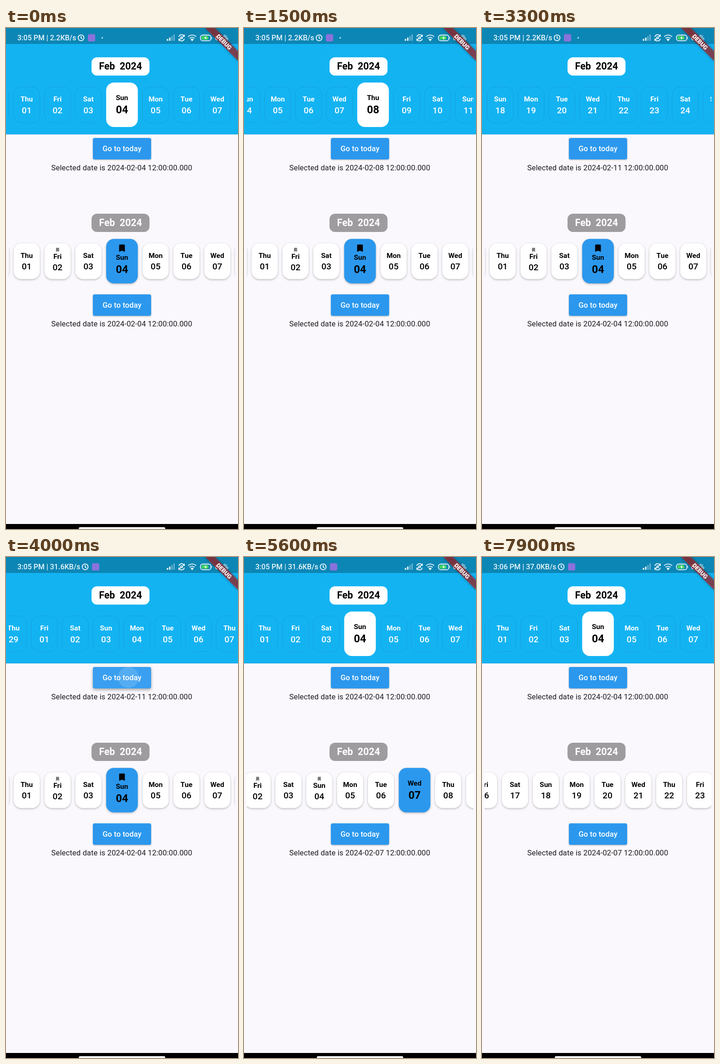
An HTML page that plays this animation: 510x1098 px, repeating every 8 s.

```html
<!DOCTYPE html>
<html lang="en">
<head>
<meta charset="utf-8">
<title>Date timeline</title>
<style>
  html, body { margin: 0; width: 100%; height: 100%; overflow: hidden; background: #faf8fc; }
  svg { display: block; width: 100%; height: 100%; }
  text { font-family: Roboto, sans-serif; white-space: pre; }
  .mid { text-anchor: middle; }
  .status text { font-size: 16px; font-weight: 500; fill: #eaf6fb; }
  .line { fill: none; stroke: #eaf6fb; stroke-width: 1.9; }
  .solid { fill: #eaf6fb; }

  .month { font-size: 21.3px; font-weight: 700; }
  .btn { fill: #2b98ee; filter: drop-shadow(0 1.6px 1.6px rgba(0,0,0,.3)); }
  .btn.down { fill: #3a9ff0; filter: drop-shadow(0 3px 3px rgba(0,0,0,.35)); }
  .btnText { font-size: 16.5px; font-weight: 500; letter-spacing: .12px; fill: #fff; }
  .info { font-size: 16.5px; letter-spacing: .15px; fill: #1d1b20; }

  .card rect { x: -28.8px; y: 129px; width: 57.6px; height: 78.6px; rx: 17px; }
  .card .day { font-size: 15.5px; font-weight: 700; transform: translateY(161.4px); }
  .card .num { font-size: 19px; font-weight: 500; transform: translateY(186.5px); }
  .card .mark { fill: #79777a; transform: translateY(143.4px) scale(.48); }
  .card.marked .day { transform: translateY(163.2px); }
  .card.marked .num { transform: translateY(188.4px); }
  .card.on rect { x: -34.8px; y: 119.6px; width: 69.6px; height: 97.4px; }
  .card.on .day { transform: translateY(158.2px); }
  .card.on .num { font-size: 23.5px; font-weight: 700; transform: translateY(186.8px); }
  .card.on .mark { fill: #000; transform: translateY(139.8px) scale(.9); }
  .card.on.marked .day { transform: translateY(165.2px); }
  .card.on.marked .num { transform: translateY(193.8px); }

  .blue .card rect { fill: none; stroke: #1a7fae; stroke-opacity: .36; }
  .blue .card text { fill: #fff; }
  .blue .card.on rect { fill: #fff; stroke: none; }
  .blue .card.on text { fill: #000; }
  .plain .cards { filter: drop-shadow(0 2px 2px rgba(0,0,0,.2)) drop-shadow(0 0 1px rgba(0,0,0,.1)); }
  .plain .card rect { fill: #fff; }
  .plain .card.on rect { fill: #2b98ee; }
</style>
</head>
<body>
<svg viewBox="0 0 510 1098" preserveAspectRatio="none">
  <defs>
    <clipPath id="view"><rect x="5.8" y="110" width="498.4" height="115"/></clipPath>
    <clipPath id="btnBox"><rect x="191" y="241" width="128" height="47" rx="4"/></clipPath>
  </defs>
  <rect width="510" height="1098" fill="#faf8fc"/>
  <rect width="510" height="233" fill="#13b3f2"/>
  <rect y="232.3" width="510" height="1" fill="#178fc4" opacity=".6"/>

  <g class="status">
    <rect width="510" height="35" fill="#0c86b5"/>
    <text id="clock" x="25" y="27.4"></text>
    <g id="notes">
      <circle class="line" cx="165" cy="21.5" r="6.4"/>
      <path class="line" d="M165 17.5v4.4l3 1.8"/>
      <rect x="180" y="13.5" width="16" height="16" rx="3.5" fill="#8a72dc"/>
    </g>
    <circle id="dot" class="solid" cx="211.5" cy="21.5" r="1.6"/>
    <path class="solid" d="M353.5 24h3v4h-3zM358.5 21h3v7h-3z"/>
    <path class="solid" opacity=".4" d="M363.3 17.5h3V28h-3zM368 14h3v14h-3z"/>
    <path class="line" d="M380 19.5a6.3 6.3 0 0 1 11.5-1.8M392 23.5a6.3 6.3 0 0 1-11.5 1.8M392 14.5v4h-4M380 28.3v-4h4"/>
    <circle class="line" cx="386" cy="21.5" r="2"/>
    <path class="line" stroke-width="2.4" d="M400.5 19a12.3 12.3 0 0 1 17.4 0M403.7 22.6a7.8 7.8 0 0 1 11 0"/>
    <path class="solid" d="M409.2 29l-3.6-4a5.2 5.2 0 0 1 7.2 0z"/>
    <rect class="line" stroke-width="1.6" x="427.5" y="15.5" width="23" height="12.4" rx="5"/>
    <rect x="430" y="17.8" width="15" height="7.8" rx="2.8" fill="#40d65c"/>
    <path class="solid" d="M440 17l-4.5 5.3h3l-1 4.2 4.5-5.4h-3zM451.6 19.5c1.6.6 1.6 4 0 4.5z"/>
    <text x="459" y="27.4">66%</text>
  </g>

  <g id="panels"></g>

  <g transform="translate(510 0) rotate(45)">
    <rect x="-51" y="35.7" width="102" height="15.3" fill="#b71c1c" fill-opacity=".63"
          style="filter:drop-shadow(0 0 3px rgba(0,0,0,.5))"/>
    <text class="mid" y="48" font-size="13" font-weight="900" fill="#fff">DEBUG</text>
  </g>

  <rect y="1087" width="510" height="11" fill="#000"/>
  <rect x="160" y="1094" width="190" height="8" rx="3" fill="#fff"/>
</svg>

<script>
const LOOP = 8000, STEP = 100;
const PITCH = 67.8, GROW = 12.2, ORIGIN = 248.9;   // card spacing, extra width of the chosen card
const FIRST = -6, LAST = 38;                       // days relative to 4 February
const BOOKMARK = 'M5-9H-5C-6.1-9-7-8.1-7-7V9L0 6 7 9V-7C7-8.1 6.1-9 5-9z';
const NAMES = ['Sun', 'Mon', 'Tue', 'Wed', 'Thu', 'Fri', 'Sat'];
const $ = id => document.getElementById(id);
const two = n => String(n).padStart(2, '0');
const dateOf = k => new Date(Date.UTC(2024, 1, 4 + k));

// [start, end, target scroll]; every move decelerates
const scrolls = {
  top: [[250, 1150, 150], [1328, 1828, 312.4], [2150, 2650, 546.8],
        [2800, 3300, 1170.3], [3300, 3800, 1939.6], [4100, 4700, 0]],
  low: [[5480, 6088, 234.4], [6600, 7400, 1070]]
};
// [time, value]
const picks = {
  top: [[0, 0], [1328, 4], [2150, 7], [4100, 0]],
  low: [[0, 0], [5480, 3]]
};
const speeds = [[0, '2.2'], [3700, '31.6'], [7500, '37.0']];
const minutes = [[0, '3:05'], [7000, '3:06']];

function scrollAt(moves, t) {
  let pos = 0;
  for (const [from, to, goal] of moves) {
    if (t <= from) break;
    const rest = 1 - Math.min(1, (t - from) / (to - from));
    pos = goal + (pos - goal) * rest * rest;
  }
  return pos;
}

const valueAt = (list, t) => list.filter(([time]) => time <= t).pop()[1];

function cardMarkup(k, marks) {
  const d = dateOf(k), marked = marks.includes(k);
  return `<g class="card${marked ? ' marked' : ''}"><rect/>` +
    (marked ? `<path class="mark" d="${BOOKMARK}"/>` : '') +
    `<text class="day mid">${NAMES[d.getUTCDay()]}</text>` +
    `<text class="num mid">${two(d.getUTCDate())}</text></g>`;
}

function panelMarkup(id, theme, dy, pill, ink, marks) {
  let cards = '';
  for (let k = FIRST; k <= LAST; k++) cards += cardMarkup(k, marks);
  return `<g id="${id}" class="${theme}" transform="translate(0 ${dy})">
    <rect x="188" y="64.2" width="127.5" height="40" rx="12" fill="${pill}"/>
    <text class="month mid" x="251.7" y="91.4" fill="${ink}">Feb  2024</text>
    <g clip-path="url(#view)"><g class="cards">${cards}</g></g>
    <rect class="btn" x="191" y="241" width="128" height="47" rx="4"/>
    <g clip-path="url(#btnBox)"><circle class="ripple" cx="269" cy="264" r="0" fill="#fff"/></g>
    <text class="btnText mid" x="255" y="270.4">Go to today</text>
    <text class="info mid" x="254.5" y="311.6"></text>
  </g>`;
}

$('panels').innerHTML =
  panelMarkup('top', 'blue', 0, '#fff', '#000', []) +
  panelMarkup('low', 'plain', 342.7, '#9e9c9f', '#fff', [-2, 0]);

const panels = ['top', 'low'].map(id => ({
  id,
  cards: [...$(id).querySelectorAll('.card')],
  info: $(id).querySelector('.info')
}));
const button = $('top').querySelector('.btn');
const ripple = $('top').querySelector('.ripple');

function drawPanel({ id, cards, info }, t) {
  const scroll = scrollAt(scrolls[id], t), pick = valueAt(picks[id], t);
  cards.forEach((card, i) => {
    const k = FIRST + i;
    const x = ORIGIN + PITCH * k + GROW * (1 + Math.sign(k - pick)) / 2 - scroll;
    card.setAttribute('transform', `translate(${x.toFixed(2)} 0)`);
    card.classList.toggle('on', k === pick);
    card.style.display = x < -45 || x > 555 ? 'none' : '';
  });
  info.textContent = `Selected date is ${dateOf(pick).toISOString().slice(0, 10)} 12:00:00.000`;
}

function drawPress(t) {
  const age = t - 3880, live = age > 0 && age < 450;
  button.classList.toggle('down', live && age < 300);
  ripple.setAttribute('r', live ? 8 + age * .125 : 0);
  ripple.setAttribute('opacity', live ? .13 * Math.min(1, (450 - age) / 250) : 0);
}

function drawStatus(t) {
  const speed = valueAt(speeds, t);
  $('clock').textContent = `${valueAt(minutes, t)} PM | ${speed}KB/s`;
  $('notes').setAttribute('transform', `translate(${speed.length > 3 ? 9 : 0} 0)`);
  $('dot').setAttribute('opacity', t < 3700 ? 1 : 0);
}

function tick() {
  const t = Math.floor((performance.now() + 15) / STEP) * STEP % LOOP;
  panels.forEach(p => drawPanel(p, t));
  drawPress(t);
  drawStatus(t);
  requestAnimationFrame(tick);
}
tick();
</script>
</body>
</html>
```
